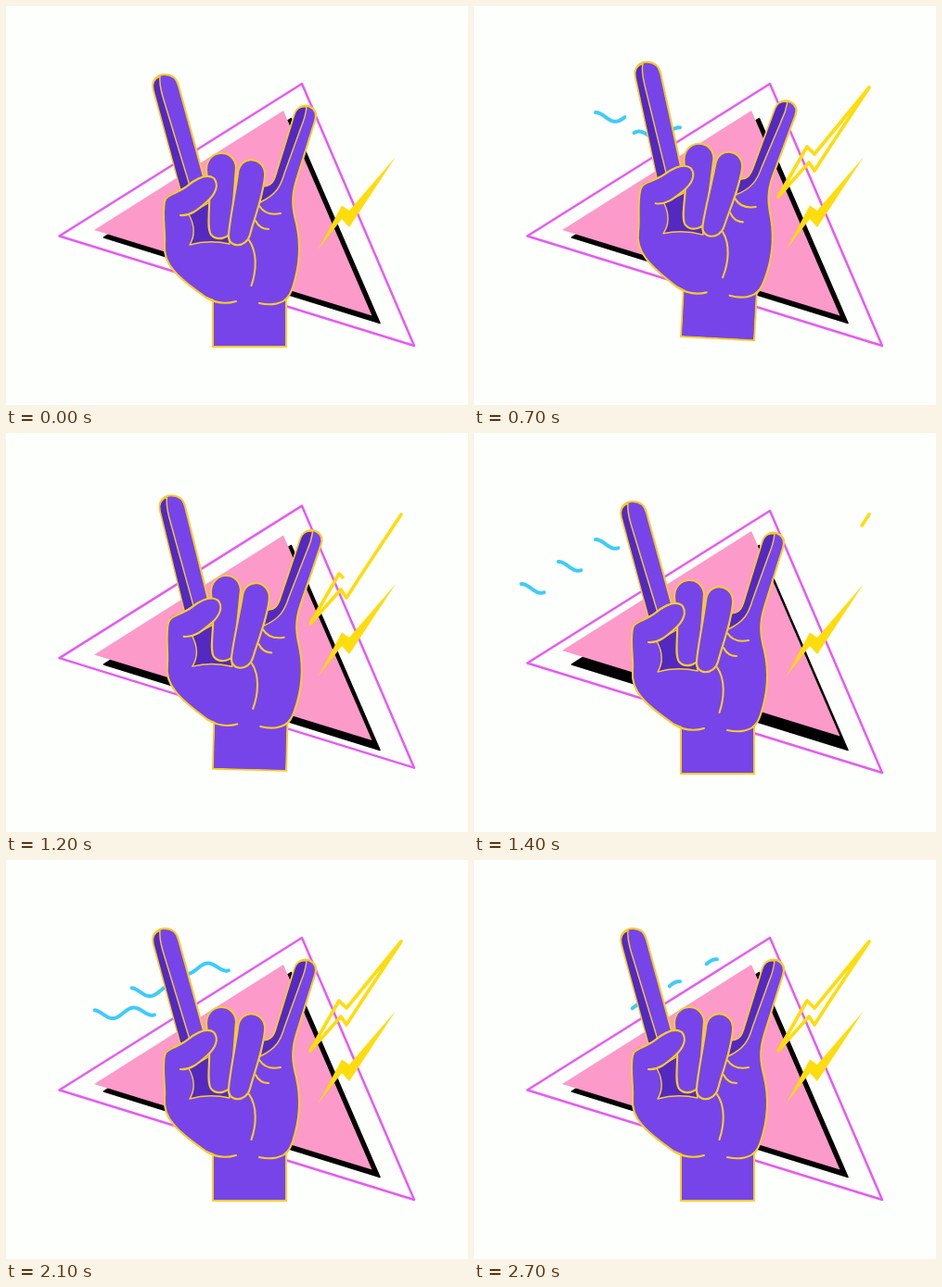
These frames come from a looping animation (498x431 px, 2.75 s). An HTML page:

```html
<!DOCTYPE html>
<html lang="en">
<head>
<meta charset="utf-8">
<title>Rock on</title>
<style>
  html, body { margin: 0; width: 100%; height: 100%; overflow: hidden; background: #fdfffc; }
  svg { display: block; width: 498px; height: 431px; }
  path { stroke-linejoin: round; stroke-linecap: round; }
  #hand path { fill: #7744ea; stroke: #f6cd28; stroke-width: 2.1; }
  #hand .shade { fill: #5429c2; stroke-width: 1.4; }
  #hand .line { fill: none; }
  #hand .plain { stroke: none; }
  .wave { fill: none; stroke: #3fcbfb; stroke-width: 4; }
  #spark { fill: none; stroke: #ffdc0c; stroke-width: 3.6; }
</style>
</head>
<body>
<svg viewBox="0 0 498 431">
  <path id="frame" d="M319 84L57.500 248.500L440 367Z" fill="none" stroke="#e75af5" stroke-width="2.500"/>
  <path d="M307.500 121.500L105.500 250L403 342.500Z" stroke="#000" stroke-width="1.500"/>
  <path id="pink" d="M299 113L95 242L394.500 334.500Z" fill="#fc9ac9"/>
  <g id="waves"></g>
  <path d="M420 163L370 221L362 215.500L336.500 263L362 230L370 239Z" fill="#ffdc0c"/>
  <path id="spark" pathLength="100" d="M426 88L367 160L359 152L328 206L361 169L367 178L385 150L426 88"/>
  <g id="hand">
    <path d="M190 203L159 91C156 80 163 74 171 74C179 74 184 78 186 86L214 188Z"/>
    <path class="shade" d="M188 199L159 91C157 83 161 78 166 76C165 84 167 91 169 98L198 194Z"/>
    <path d="M223 316V368H302V316Z"/>
    <path d="M171 211C173 203 185 203 196 194C204 187 214 183 222 185L250 196L277 195C286 195 289 189 291 182L311 117C314 108 322 106 328 109C334 112 335 118 333 124L313 188C307 207 309 220 313 235C318 257 317 280 309 304C305 316 300 321 288 322L248 320C236 322 226 320 216 315C203 306 190 297 181 286C172 276 170 267 171 256C172 244 168 226 171 211Z"/>
    <path class="plain" d="M224 317V367H301V317Z"/>
    <path class="shade" d="M274 212L277 195C286 195 289 189 291 182L311 117C313 111 318 108 324 109C323 118 321 124 318 131L300 181C296 195 291 204 274 212Z"/>
    <path class="shade" d="M197 225C203 236 204 248 198 258C212 254 227 254 241 257L232 205Z"/>
    <path d="M216 177C216 154 246 153 248 174L243 240C242 252 227 254 221 247C216 240 220 220 219 205Z"/>
    <path d="M250 181C252 159 281 163 279 184C277 206 268 228 263 247C259 262 239 262 240 247C241 232 247 203 250 181Z"/>
    <path class="plain" d="M172 207C176 202 187 201 196 194C206 186 217 181 224 186C230 193 226 203 217 211C207 220 199 227 188 226L176 228Z"/>
    <path class="line" d="M171 211C173 203 185 203 196 194C206 186 217 181 224 186C230 193 226 203 217 211C207 220 199 227 188 226"/>
    <path class="line" d="M262 253C271 266 270 286 264.500 302"/>
    <path class="line" d="M273 216C279 225 287 226 296 224"/>
    <path class="line" d="M269 232C272 238 277 241 283 241"/>
    <path class="line" d="M216 315C226 321 238 322 248 319"/>
    <path class="line" d="M273 321C286 324 299 322 305 313"/>
  </g>
</svg>
<script>
const LOOP = 2750, STEP = 50, LEN = 131;
const $ = id => document.getElementById(id);

const clamp = x => Math.min(1, Math.max(0, x));
const ramp = (t, a, b) => clamp((t - a) / (b - a));
const smooth = p => (1 - Math.cos(Math.PI * p)) / 2;
const bump = (t, a, top, b) => smooth(ramp(t, a, top)) * (1 - smooth(ramp(t, top, b)));

// Show only the part of a path between two distances.
function trim(el, from, to) {
  el.style.visibility = to - from > 0.3 ? "visible" : "hidden";
  el.style.strokeDasharray = `${Math.max(0, to - from)} 999`;
  el.style.strokeDashoffset = -from;
}

// First pass per wave: head start, head end, tail start, tail end.
const passes = [[50, 420, 230, 650], [250, 660, 450, 850], [600, 1020, 1000, 1200]];

const waves = passes.map((pass, i) => {
  const pts = [];
  for (let x = 0; x <= LEN; x++) {
    const y = 168 - 8 * (x / LEN) ** 2 - 5 * Math.cos(2 * Math.PI * x / 43) - 24 * i;
    pts.push(`${51 + 40 * i + x} ${y.toFixed(2)}`);
  }
  const el = document.createElementNS("http://www.w3.org/2000/svg", "path");
  el.setAttribute("d", "M" + pts.join("L"));
  el.setAttribute("pathLength", LEN);
  el.setAttribute("class", "wave");
  $("waves").append(el);
  return el;
});

function draw(t) {
  const jump = bump(t, 580, 900, 1300);
  $("hand").setAttribute("transform", `translate(0 ${-29 * jump}) rotate(${10 * jump} 262 368)`);
  $("frame").setAttribute("transform", `translate(0 ${-15.5 * bump(t, 800, 1050, 1300)})`);
  $("pink").setAttribute("transform", `translate(0 ${-7.5 * bump(t, 1100, 1350, 1620)})`);

  waves.forEach((el, i) => {
    const [a, b, c, d] = t < 1200 ? passes[i] : [1200, 2290, 1745, 2790];
    trim(el, LEN * ramp(t, c, d), LEN * ramp(t, a, b));
  });

  if (t < 1410) trim($("spark"), 100 * ramp(t, 950, 1410) ** 2, 100 * ramp(t, 0, 515));
  else trim($("spark"), 0, 100 * ramp(t, 1400, 1915));
}

function tick() {
  draw(Math.floor(performance.now() % LOOP / STEP) * STEP);
  requestAnimationFrame(tick);
}
tick();
</script>
</body>
</html>
```
